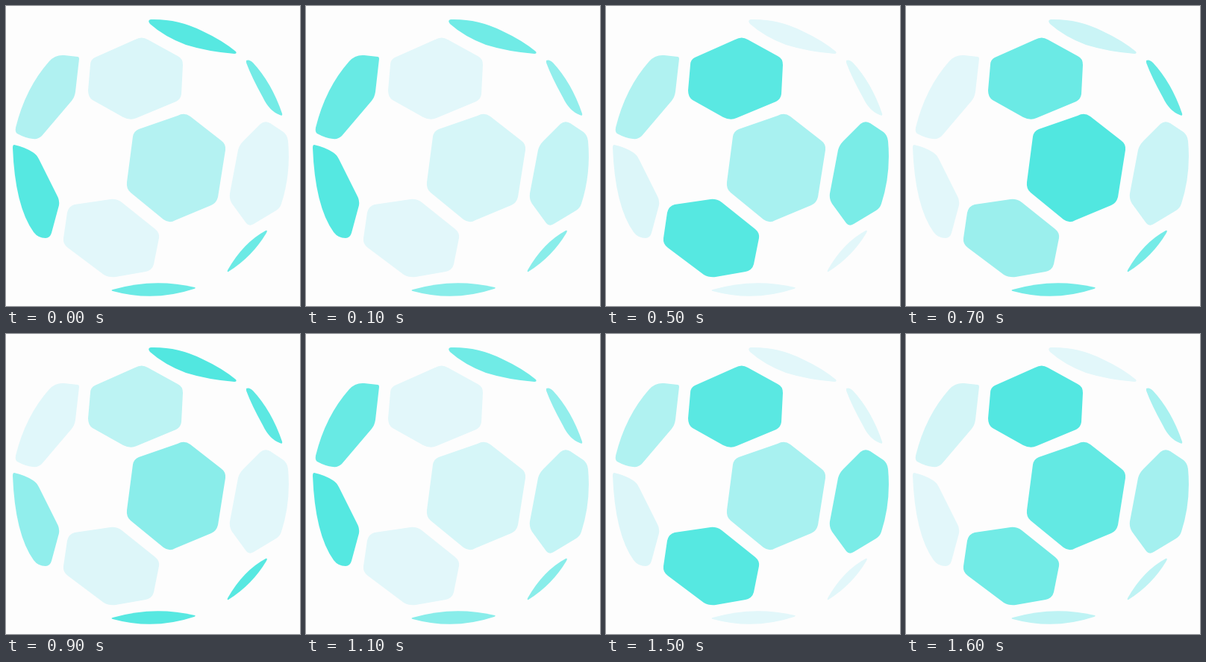
An HTML page that plays this animation: 394x402 px, repeating every 1700 ms.

```html
<!DOCTYPE html>
<html lang="en">
<head>
<meta charset="utf-8">
<title>Ball loader</title>
<style>
  html, body { margin: 0; width: 100%; height: 100%; overflow: hidden; background: #fdfdfd; }
  svg { display: block; width: 100%; height: 100%; }
</style>
</head>
<body>
<!-- data-peak: step of full colour; data-fall: steps to fade out -->
<svg viewBox="0 0 394 402">
  <path data-peak="5.5" d="M119 69L173 45Q182 40 190 45L230 67Q237 70 237 79L235 118Q234 125 228 128L175 150Q167 154 157 149L116 126Q110 122 110 113L113 79Q113 72 119 69Z"/>
  <path data-peak="6.7" d="M178 165L230 147Q239 142 247 148L288 180Q295 185 294 193L284 256Q282 264 275 267L227 287Q219 292 211 286L167 250Q161 245 162 236L170 175Q171 168 178 165Z"/>
  <path data-peak="1.8" d="M78 66L96 68Q98 68 98 71L93 115Q92 122 88 127L48 174Q43 179 36 178Q26 177 15 171Q12 169 13 163Q26 110 58 74Q66 65 78 66Z"/>
  <path data-peak="0.4" d="M11 186Q25 189 36 196Q41 199 44 205L68 253Q72 260 71 267L61 304Q59 311 53 311Q43 311 37 303Q12 268 9 190Q9 186 11 186Z"/>
  <path data-peak="4.3" d="M92 266L140 259Q148 258 155 263L200 299Q206 304 205 311L198 346Q196 354 187 356L147 363Q138 364 131 360L83 324Q76 319 77 311L82 277Q84 268 92 266Z"/>
  <path data-peak="3.1" d="M318 181L341 158Q347 153 354 157L372 169Q377 173 378 181Q382 225 369 265Q367 271 362 274L332 292Q326 296 322 291L303 265Q299 259 300 251L311 193Q313 186 318 181Z"/>
  <path data-peak="9.2" data-fall="5.8" d="M194 18Q230 17 262 33Q290 46 308 61Q310 64 306 64Q270 61 241 52Q212 41 193 24Q189 19 194 18Z"/>
  <path data-peak="7.7" data-fall="7" d="M322 73Q326 71 331 76Q356 103 370 144Q371 148 367 146Q353 141 344 122Q329 95 322 76Z"/>
  <path data-peak="8" data-fall="7" d="M348 301Q351 300 349 304Q330 336 298 356Q296 357 297 354Q318 317 348 301Z"/>
  <path data-peak="8" data-fall="7" d="M143 380Q198 364 253 377Q255 378 252 379Q198 397 143 382Q140 381 143 380Z"/>
</svg>
<script>
  const STEP = 100, LOOP = 1700, CYCLE = 10, RISE = 3, FALL = 5.3;
  const PALE = [226, 247, 250], BRIGHT = [80, 231, 224];

  const patches = [...document.querySelectorAll('path')].map(el => ({
    el,
    peak: +el.dataset.peak,
    fall: +(el.dataset.fall || FALL)
  }));

  // Cosine bump with a quick rise and a slower fall
  function glow(step, { peak, fall }) {
    const d = (step - peak + RISE + 2 * CYCLE) % CYCLE - RISE;
    const x = Math.min(1, d < 0 ? -d / RISE : d / fall);
    return (1 + Math.cos(Math.PI * x)) / 2;
  }

  function draw(now) {
    const step = Math.floor(now % LOOP / STEP);
    for (const patch of patches) {
      const k = glow(step, patch);
      const rgb = PALE.map((c, i) => Math.round(c + (BRIGHT[i] - c) * k));
      patch.el.setAttribute('fill', `rgb(${rgb})`);
    }
  }

  let start;
  function tick(now) {
    start ??= now;
    draw(now - start);
    requestAnimationFrame(tick);
  }
  draw(0);
  requestAnimationFrame(tick);
</script>
</body>
</html>
```
